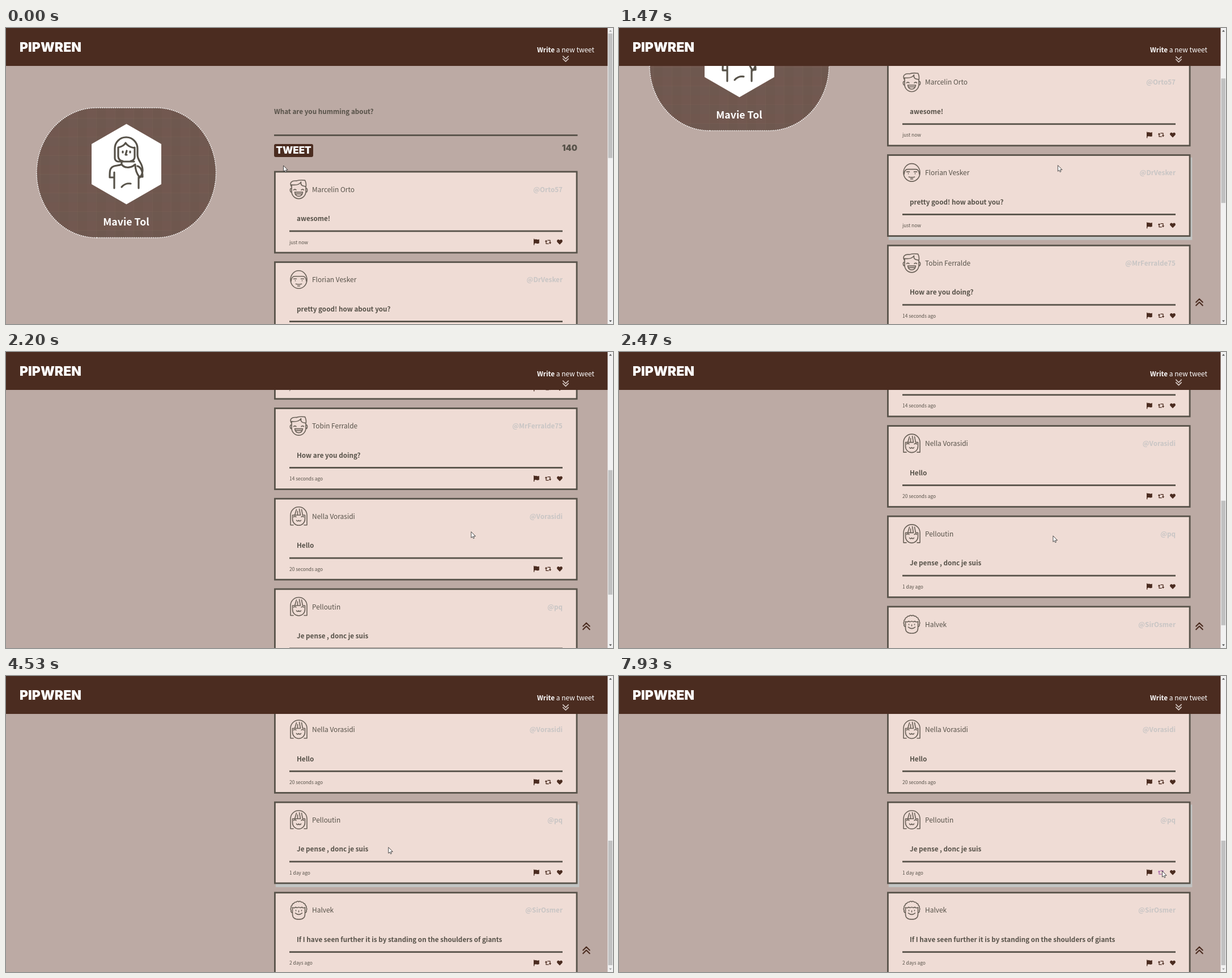
These frames come from a looping animation (1071 px wide and 523 px high, 8000 ms). An HTML page with a canvas:

```html
<!DOCTYPE html>
<html lang="en">
<head>
<meta charset="utf-8">
<style>
html, body { margin: 0; width: 100%; height: 100%; overflow: hidden; background: #bcaaa4; }
canvas { display: block; }
</style>
</head>
<body>
<canvas id="stage" width="1071" height="523"></canvas>
<script>
const ctx = document.getElementById('stage').getContext('2d');
const LOOP = 8000;
const SANS = '"Noto Sans CJK JP", "Noto Sans CJK SC", "Noto Sans CJK", "Open Sans", sans-serif';
const CHUNKY = 'Inter, "DejaVu Sans", sans-serif';
const BROWN = '#4b2c20', INK = '#575249', PAPER = '#efdcd5', PAGE = '#bcaaa4';
const HOVER = '#a868ab';
const RULE = 2.8;
const CARD = { x: 473, y: 252.6, w: 535.5, h: 145.8, pitch: 159.7 };
const MAX_SCROLL = 669.7;

const cards = [
  ['boy', 'Marcelin Orto', '@Orto57', 'awesome!', 'just now'],
  ['round', 'Florian Vesker', '@DrVesker', 'pretty good! how about you?', 'just now'],
  ['boy', 'Tobin Ferralde', '@MrFerralde75', 'How are you doing?', '14 seconds ago'],
  ['girl', 'Nella Vorasidi', '@Vorasidi', 'Hello', '20 seconds ago'],
  ['girl', 'Pelloutin', '@pq', 'Je pense , donc je suis', '1 day ago'],
  ['curly', 'Halvek', '@SirOsmer', 'If I have seen further it is by standing on the shoulders of giants', '2 days ago']
];

// Keys are [time, value, ...].
const scrollKeys = [[1090, 0], [1200, 48.5], [1400, 150], [1730, 332], [1950, 400], [2200, 473.4], [2600, 664], [2720, MAX_SCROLL]];
const mouseKeys = [
  [0, 489.5, 243.5], [90, 492, 242], [700, 690, 207], [1200, 736.5, 196.5], [1730, 810.5, 287.5],
  [2200, 821, 318], [2500, 760, 326], [3000, 495.5, 347.5], [3600, 440, 362], [3800, 421, 371],
  [4050, 470, 358], [4330, 584, 331], [4530, 674.5, 303], [4850, 770, 309], [5200, 859, 326],
  [5650, 950, 343], [6000, 972, 345], [6500, 976, 346], [6950, 957, 346], [7350, 936, 349],
  [7780, 938, 347], [7930, 958.5, 345]
];

const eyes = 'M-9 1q2.2-2 4.4 0M4.6 1q2.2-2 4.4 0';
let curls = '';
for (let i = 0; i <= 12; i++) {
  const a = Math.PI * (0.84 + i * 0.11);
  const x = 13.5 * Math.cos(a), y = 13 * Math.sin(a) - 2;
  curls += i ? `A3 3 0 0 1 ${x} ${y}` : `M${x} ${y}`;
}
const avatars = {
  boy: 'M-12.5-7V4a12.5 12.5 0 0 0 25 0V-4M-12.5-2c-4 0-3 7 0 7M12.5-2c4 0 3 7 0 7' +
    'M-13-5C-17-12-12-16-4-15Q2-17 11-16Q14-10 12.5-4M-13-8C-5-7 1-8 4-13M4-13C3-7 6-6 12-5' + eyes +
    'M-7 5h14q-1 7-7 7t-7-7zM-5 8h10',
  round: 'M-14.5 0a14.5 16 0 0 1 29 0a14.5 15.5 0 0 1-29 0M-13.5 3C-13-4-10-6-7-6H7C10-6 13-4 13.5 3' +
    'M-9-1.5h5M4-1.5h5M-6 1.5v.5M6 1.5v.5M-5 7.5q5 1.5 10 0M-2 11h4',
  girl: 'M-9.5 15.5h-5V-2a14.5 14.5 0 0 1 29 0V15.5h-5M-11-2V5a11 11 0 0 0 22 0V-2' +
    'M-11-2h4L-4-12M-7-2H3L1-13M-2-3V-9M5-12L7-2h4' + eyes + 'M-4 7q2 3 4 0q2 3 4 0',
  curly: curls + 'M-11-4V7q0 9 11 9t11-9V-4M-11-5q3 2 5.5-.5q2.5 2 5.5 0q3 2 5.5 0q2.5 2.5 5.5.5' +
    'M-5 0v1M5 0v1M-6 5q6 5 12 0M0 1v2'
};
for (const kind in avatars) avatars[kind] = new Path2D(avatars[kind]);

const portrait = new Path2D(
  'M226 236H198a6 6 0 0 1-6-6V213a20 20 0 0 1 40 0v12M198 211v16a8 8 0 0 0 8 8M227 211v17a7 7 0 0 1-7 7' +
  'M198 211c6-1 10-3 13-8 3 5 9 8 16 9M206 218v2M219 218v2M213 217l-2 7h2' +
  'M204 237v4c-6 3-12 1-17 5-4 3-4 9-4 18h8' +
  'M232 224c0 11 9 14 9 27 0 5-2 10-5 13-6-7-8-14-8-23-9 8-20 6-24 0' +
  'M232 244c6 2 9 8 9 19h-7M191 255v28M234 264v19M204 281c3-4 9-7 16-6');
const flag = new Path2D('M-5-5.5h1.3v1.2q2-1.2 4.1-.2t4.4-.4V2.2q-2.3 1.2-4.5.4T-3.7 2.8V5.5H-5z');
const heart = new Path2D('M0 4.6L-4.2.4C-6.6-3-2.4-6 0-3 2.4-6 6.6-3 4.2.4z');
const retweetBars = new Path2D('M-3.5-1V3H.8M3.5 1V-3H-.8');
const retweetHeads = new Path2D('M-5.8-.6L-3.5-3.6-1.2-.6zM5.8.6L3.5 3.6 1.2.6z');
const arrow = new Path2D('M0 0V10.2L2.3 8.1 3.8 11.4 5.5 10.7 4 7.4H7.2z');

function valueAt(keys, t, column = 1) {
  const next = keys.findIndex(k => k[0] > t);
  if (next === 0) return keys[0][column];
  if (next < 0) return keys[keys.length - 1][column];
  const a = keys[next - 1], b = keys[next];
  return a[column] + (b[column] - a[column]) * (t - a[0]) / (b[0] - a[0]);
}

function rect(x, y, w, h, color) {
  ctx.fillStyle = color;
  ctx.fillRect(x, y, w, h);
}

function text(str, x, y, size, color, weight = 400, align = 'left', family = SANS) {
  ctx.font = `${weight} ${size}px ${family}`;
  ctx.textAlign = align;
  ctx.fillStyle = color;
  ctx.fillText(str, x, y);
}

function at(x, y, draw) {
  ctx.save();
  ctx.translate(x, y);
  draw();
  ctx.restore();
}

function stroke(path, width, color) {
  ctx.lineWidth = width;
  ctx.strokeStyle = color;
  ctx.lineCap = ctx.lineJoin = 'round';
  ctx.stroke(path);
}

function fill(path, color) {
  ctx.fillStyle = color;
  ctx.fill(path);
}

function chevrons(x, y, half, dir, color, width) {
  const path = new Path2D();
  for (const top of [-half, 0]) {
    const tip = top + half;
    path.moveTo(-half, dir > 0 ? top : tip);
    path.lineTo(0, dir > 0 ? tip : top);
    path.lineTo(half, dir > 0 ? top : tip);
  }
  at(x, y, () => stroke(path, width, color));
}

function pill(x, y, w, h) {
  const rx = w / 3, ry = h / 2, path = new Path2D();
  path.ellipse(x + rx, y + ry, rx, ry, 0, Math.PI / 2, Math.PI * 1.5);
  path.ellipse(x + w - rx, y + ry, rx, ry, 0, -Math.PI / 2, Math.PI / 2);
  path.closePath();
  return path;
}

function drawProfile() {
  const shape = pill(54, 141, 316.5, 229.5);
  ctx.save();
  ctx.clip(shape);
  rect(53, 140, 320, 232, '#705951');
  for (let i = 0; i < 10; i++) {
    rect(60 + i * 33, 140, 16.5, 232, 'rgba(88,78,66,.1)');
    rect(53, 143 + i * 33, 320, 16.5, 'rgba(130,82,74,.1)');
    rect(60 + i * 33, 140, 0.8, 232, 'rgba(170,140,125,.13)');
    rect(53, 159 + i * 33, 320, 0.8, 'rgba(170,140,125,.13)');
  }
  ctx.restore();
  ctx.setLineDash([0, 3.3]);
  stroke(shape, 1.8, '#fff');
  ctx.setLineDash([]);
  fill(new Path2D('M212.5 169.5L274 205V276L212.5 311.5 151 276V205z'), '#fff');
  stroke(portrait, 3.2, INK);
  text('Mavie Tol', 212, 349, 17.7, '#fff', 600, 'center');
}

function drawForm() {
  text('What are you humming about?', 473, 152, 11.7, INK, 600);
  rect(473, 188.1, CARD.w, RULE, INK);
  ctx.beginPath();
  ctx.roundRect(473, 205, 69, 23, 3);
  ctx.fillStyle = BROWN;
  ctx.fill();
  text('TWEET', 507.5, 222, 17, '#fff', 900, 'center', CHUNKY);
  text('140', 1008, 217, 14.5, INK, 900, 'right', CHUNKY);
}

function drawCard([kind, name, handle, message, age], y, mouse) {
  const { x, w, h } = CARD;
  const hovered = mouse && mouse.x >= x && mouse.x <= x + w && mouse.y >= y && mouse.y <= y + h;
  if (hovered) rect(x + 2.8, y + 5.6, w, h, '#c2c4c3');
  rect(x, y, w, h, INK);
  rect(x + RULE, y + RULE, w - 2 * RULE, h - 2 * RULE, PAPER);
  at(516.5, y + 32.5, () => stroke(avatars[kind], 1.6, '#6b6259'));
  text(name, 540, y + 37, 11.95, INK);
  text(handle, 982, y + 37, 11.7, '#c8c5c4', 600, 'right');
  text(message, 513, y + 88.5, 11.7, INK, 600);
  rect(500, y + 104.9, 482, RULE, INK);
  text(age, 500, y + 129, 8.35, INK);
  const iconY = y + 125.5;
  const tint = cx => hovered && Math.abs(mouse.x - cx) < 7 && Math.abs(mouse.y - iconY) < 7 ? HOVER : BROWN;
  at(936, iconY, () => fill(flag, tint(936)));
  at(956.5, iconY, () => {
    stroke(retweetBars, 1.3, tint(956.5));
    fill(retweetHeads, tint(956.5));
  });
  at(977, iconY, () => fill(heart, tint(977)));
}

function drawHeader(t) {
  rect(0, 0, 1062, 67, BROWN);
  text('PIPWREN', 24, 41.5, 23, '#fff', 900, 'left', CHUNKY);
  text(' a new tweet', 1038, 43, 11.95, '#fff', 400, 'right');
  const start = 1038 - ctx.measureText(' a new tweet').width;
  text('Write', start, 43, 11.8, '#fff', 600, 'right');
  chevrons(987.5, 54.5 - 1.2 * Math.sin(t / 800 * 2 * Math.PI), 4.7, 1, '#d3c6c1', 1.7);
}

function drawScrollbar(scroll) {
  rect(1061.5, 0, 9.5, 523, '#f1f1f1');
  rect(1062.6, 9.7 + scroll * 0.42, 7.4, 220, '#c1c1c1');
  fill(new Path2D('M1064 6.5h5l-2.5-3z'), scroll > 0 ? '#505050' : '#a3a3a3');
  fill(new Path2D('M1064 516.5h5l-2.5 3z'), scroll < MAX_SCROLL ? '#505050' : '#a3a3a3');
}

function draw(t) {
  const scroll = valueAt(scrollKeys, t);
  const mouse = { x: valueAt(mouseKeys, t, 1), y: valueAt(mouseKeys, t, 2) };
  // Hover is not refreshed while the page scrolls fast.
  const hoverPoint = t > 1900 && t < 2650 ? null : mouse;
  rect(0, 0, 1071, 523, PAGE);
  at(0, -scroll, () => { drawProfile(); drawForm(); });
  cards.forEach((card, i) => drawCard(card, CARD.y + i * CARD.pitch - scroll, hoverPoint));
  if (scroll > 100) chevrons(1024, 484.5, 5.8, -1, BROWN, 2.1);
  drawHeader(t);
  drawScrollbar(scroll);
  at(mouse.x, mouse.y, () => {
    fill(arrow, '#fff');
    stroke(arrow, 0.8, '#222');
  });
}

function tick(now) {
  draw(now % LOOP);
  requestAnimationFrame(tick);
}
requestAnimationFrame(tick);
</script>
</body>
</html>
```
